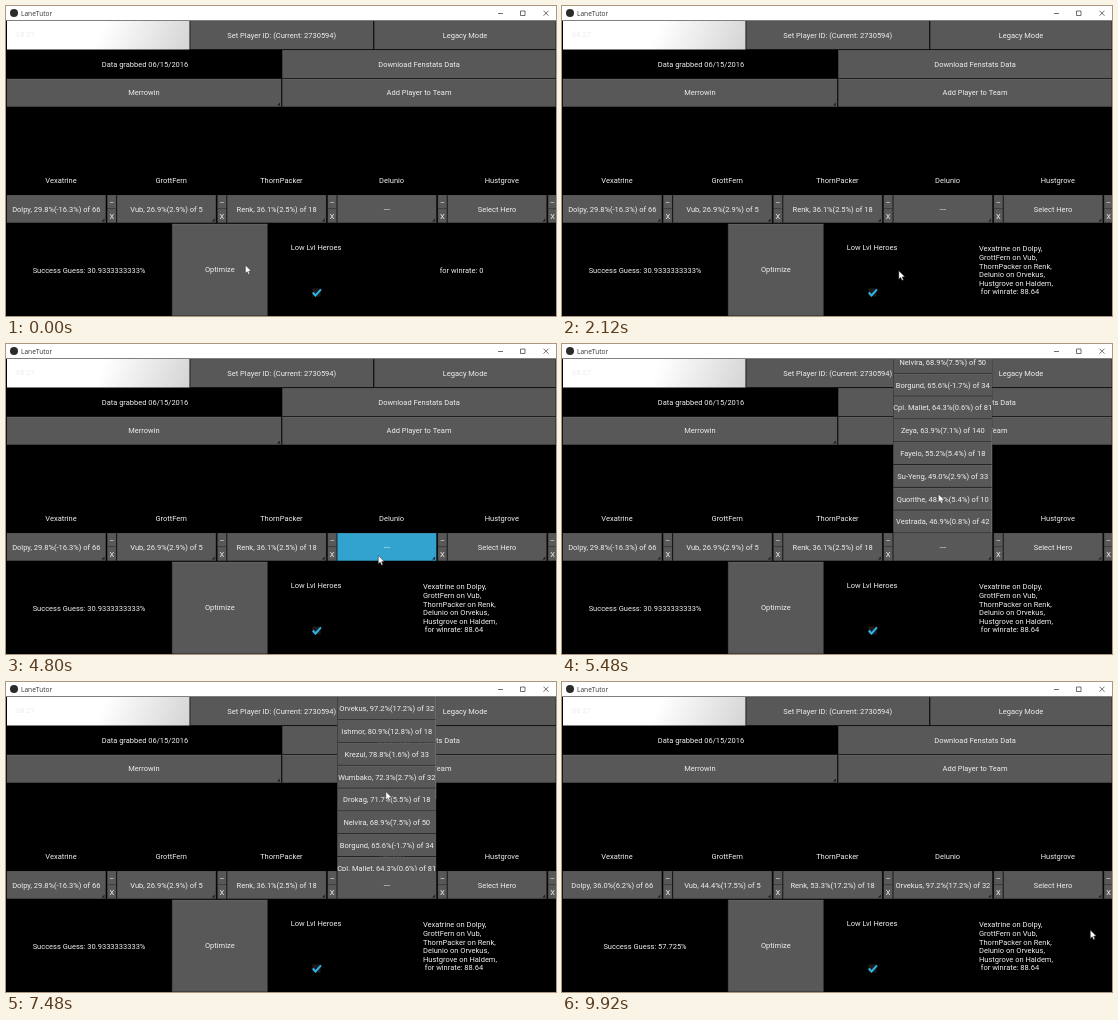
Recreate the animation shown at these times as an HTML page with a canvas. Size 550 by 310 pixels, loop 9.96 s.

```html
<!DOCTYPE html>
<html lang="en">
<head>
<meta charset="utf-8">
<title>LaneTutor</title>
<style>
html, body { margin: 0; width: 100%; height: 100%; overflow: hidden; background: #000; }
canvas { display: block; width: 550px; height: 310px; }
</style>
</head>
<body>
<canvas id="stage"></canvas>
<script>
const W = 550, H = 310, LOOP = 9960, STEP = 40;
const canvas = document.getElementById('stage');
const ctx = canvas.getContext('2d');
const dpr = window.devicePixelRatio || 1;
canvas.width = W * dpr;
canvas.height = H * dpr;

const FONT = '7.5px Roboto, "Open Sans", sans-serif';
const GREY = '#585858', BLUE = '#32a2cf', INK = '#f0f0f0';

// Moments of the interaction, in ms
const SOLVE_DOWN = 80, SOLVE_UP = 200;
const MENU_DOWN = 4800, MENU_OPEN = 4920;
const PICK_DOWN = 8240, PICK_UP = 8400;

const players = ['Vexatrine', 'GrottFern', 'ThornPacker', 'Delunio', 'Hustgrove'];
const before = ['Dolpy, 29.8%(-16.3%) of 66', 'Vub, 26.9%(2.9%) of 5', 'Renk, 36.1%(2.5%) of 18', '---', 'Select Hero'];
const after = ['Dolpy, 36.0%(6.2%) of 66', 'Vub, 44.4%(17.5%) of 5', 'Renk, 53.3%(17.2%) of 18', 'Orvekus, 97.2%(17.2%) of 32', 'Select Hero'];
const team = ['Dolpy', 'Vub', 'Renk', 'Orvekus', 'Haldem'];
const menu = [
  'Orvekus, 97.2%(17.2%) of 32', 'Ishmor, 80.9%(12.8%) of 18', 'Krezul, 78.8%(1.6%) of 33',
  'Wumbako, 72.3%(2.7%) of 32', 'Drokag, 71.7%(5.5%) of 18', 'Nelvira, 68.9%(7.5%) of 50',
  'Borgund, 65.6%(-1.7%) of 34', 'Cpl. Mallet, 64.3%(0.6%) of 81', 'Zeya, 63.9%(7.1%) of 140',
  'Fayelo, 55.2%(5.4%) of 18', 'Su-Yeng, 49.0%(2.9%) of 33', 'Quorithe, 48.0%(5.4%) of 10',
  'Vestrada, 46.9%(0.8%) of 42'
];

const MENU_X = 331, MENU_Y = 15, MENU_W = 99.5, MENU_H = 174, ITEM_H = 22.8;
const CONTENT_H = menu.length * ITEM_H, MAX_SCROLL = CONTENT_H - MENU_H;

// [time, x, y]
const cursorPath = [
  [0, 239, 259], [200, 239, 259], [800, 309, 260], [1880, 309, 260],
  [2520, 396, 275], [2720, 396, 275], [2960, 386, 258], [3720, 377, 215],
  [3840, 372, 211.5], [4920, 372, 211.5], [5400, 376, 150], [6240, 376, 150],
  [7040, 383, 27], [7280, 383, 27], [7480, 379.5, 109.5], [7680, 379.5, 109.5],
  [8040, 371, 30], [8400, 371, 30], [9200, 495, 180], [9360, 491, 184],
  [9480, 491, 184], [9520, 491, 185], [9640, 491, 185], [9920, 528, 248], [LOOP, 528, 248]
];
// [time, share of the full scroll]
const scrollPath = [
  [0, 0], [5040, 0], [5440, 1], [5760, 1], [6080, 0.5], [6240, 0.5], [7040, 0], [LOOP, 0]
];

function sample(path, t) {
  const i = Math.max(1, path.findIndex(k => k[0] > t));
  const a = path[i - 1], b = path[i];
  const u = (t - a[0]) / (b[0] - a[0]);
  const e = u * u * (3 - 2 * u);
  return a.slice(1).map((v, n) => v + (b[n + 1] - v) * e);
}

function rect(x, y, w, h, color) {
  ctx.fillStyle = color;
  ctx.fillRect(x, y, w, h);
}

function poly(points, color) {
  ctx.beginPath();
  points.forEach(([x, y]) => ctx.lineTo(x, y));
  ctx.closePath();
  ctx.fillStyle = color;
  ctx.fill();
}

function text(str, x, y, align = 'center', color = INK, font = FONT) {
  ctx.font = font;
  ctx.textAlign = align;
  ctx.fillStyle = color;
  ctx.fillText(str, x, y + 2.7);
}

function button(x, y, w, h, label, down = false) {
  rect(x, y, w, h, down ? '#174a5e' : '#292929');
  rect(x + 0.5, y + 0.5, w - 1, h - 1, down ? BLUE : GREY);
  rect(x + 0.5, y + 0.5, w - 1, 0.5, down ? '#4ab0d8' : '#686868');
  ctx.save();
  ctx.beginPath();
  ctx.rect(x, y, w, h);
  ctx.clip();
  text(label, x + w / 2, y + h / 2);
  ctx.restore();
}

function spinner(x, y, w, h, label, down) {
  button(x, y, w, h, label, down);
  const r = x + w - 1.5, b = y + h - 1.5;
  poly([[r, b], [r - 3, b], [r, b - 3]], '#1e1e1e');
}

function titleBar() {
  rect(0, 0, W, 14.5, '#fff');
  ctx.beginPath();
  ctx.arc(8, 7, 4, 0, Math.PI * 2);
  ctx.fillStyle = '#2b2b2b';
  ctx.fill();
  text('LaneTutor', 15, 6.8, 'left', '#333', '6.6px "Open Sans", sans-serif');
  ctx.strokeStyle = '#333';
  ctx.lineWidth = 0.7;
  ctx.beginPath();
  ctx.moveTo(492, 7.5); ctx.lineTo(497, 7.5);
  ctx.rect(514.5, 5, 4.5, 4.5);
  ctx.moveTo(537.5, 4.7); ctx.lineTo(542.5, 9.7);
  ctx.moveTo(542.5, 4.7); ctx.lineTo(537.5, 9.7);
  ctx.stroke();
}

function topRows() {
  const g = ctx.createLinearGradient(100, 15, 184, 52);
  g.addColorStop(0, '#fff');
  g.addColorStop(1, '#d2d2d2');
  rect(1, 15, 182.5, 28.5, g);
  text('68 27', 10, 28, 'left', '#ececec');
  button(184, 15, 183.5, 28.5, 'Set Player ID: (Current: 2730594)');
  button(368, 15, 182, 28.5, 'Legacy Mode');
  text('Data grabbed 06/15/2016', 139, 58.5);
  button(276, 44, 274, 28.5, 'Download Fenstats Data');
  spinner(0.5, 72.5, 275, 28.5, 'Merrowin');
  button(276, 72.5, 274, 28.5, 'Add Player to Team');
}

function teamRow(t) {
  const picks = t >= PICK_UP ? after : before;
  players.forEach((name, i) => {
    const x = i * 110.2 + 0.5;
    text(name, x + 54.5, 174);
    spinner(x, 189, 99.5, 28, picks[i], i === 3 && t >= MENU_DOWN && t < MENU_OPEN);
    button(x + 100.5, 189, 9.5, 14, '–');
    button(x + 100.5, 203, 9.5, 14, 'X');
  });
}

function bottomRow(t) {
  text('Success Guess: ' + (t >= PICK_UP ? '57.725%' : '30.9333333333%'), 83, 264);
  button(165.8, 217.5, 96, 92.5, 'Optimize', t >= SOLVE_DOWN && t < SOLVE_UP);
  text('Low Lvl Heroes', 310, 241);

  rect(306.5, 282.5, 8, 8, '#1c1c1c');
  ctx.beginPath();
  ctx.moveTo(306.8, 286.5);
  ctx.lineTo(309.5, 289.5);
  ctx.lineTo(315, 283.3);
  ctx.strokeStyle = '#2fb4ea';
  ctx.lineWidth = 2;
  ctx.stroke();

  if (t < SOLVE_UP) {
    text('for winrate: 0', 455.5, 264);
    return;
  }
  const lines = players.map((p, i) => p + ' on ' + team[i] + ',');
  lines.push(' for winrate: 88.64');
  lines.forEach((line, i) => text(line, 417, 242.7 + i * 8.6, 'left'));
}

function dropDown(t) {
  if (t < MENU_OPEN || t >= PICK_UP) return;
  const scroll = sample(scrollPath, t)[0] * MAX_SCROLL;
  ctx.save();
  ctx.beginPath();
  ctx.rect(MENU_X, MENU_Y, MENU_W, MENU_H);
  ctx.clip();
  menu.forEach((label, i) => {
    const y = MENU_Y + i * ITEM_H - scroll;
    if (y > MENU_Y + MENU_H || y + ITEM_H < MENU_Y) return;
    button(MENU_X, y, MENU_W, ITEM_H, label, i === 0 && t >= PICK_DOWN);
  });
  const barH = MENU_H * MENU_H / CONTENT_H;
  const barY = MENU_Y + scroll / CONTENT_H * MENU_H;
  rect(MENU_X + MENU_W - 1, barY, 1, barH, 'rgba(179,179,179,.4)');
  ctx.restore();
}

function cursor(t) {
  const [x, y] = sample(cursorPath, t);
  const shape = [[0, 0], [0, 8.4], [1.9, 6.7], [3.2, 9.7], [4.6, 9.1], [3.4, 6.2], [6, 6]];
  ctx.save();
  ctx.translate(x + 0.3, y);
  poly(shape, '#fff');
  ctx.strokeStyle = '#222';
  ctx.lineWidth = 0.5;
  ctx.stroke();
  ctx.restore();
}

function draw(now) {
  const t = Math.floor(now % LOOP / STEP) * STEP;
  ctx.setTransform(dpr, 0, 0, dpr, 0, 0);
  rect(0, 0, W, H, '#000');
  titleBar();
  topRows();
  teamRow(t);
  bottomRow(t);
  dropDown(t);
  cursor(t);
}

const start = performance.now();
function tick() {
  draw(performance.now() - start);
  requestAnimationFrame(tick);
}
tick();
</script>
</body>
</html>
```
